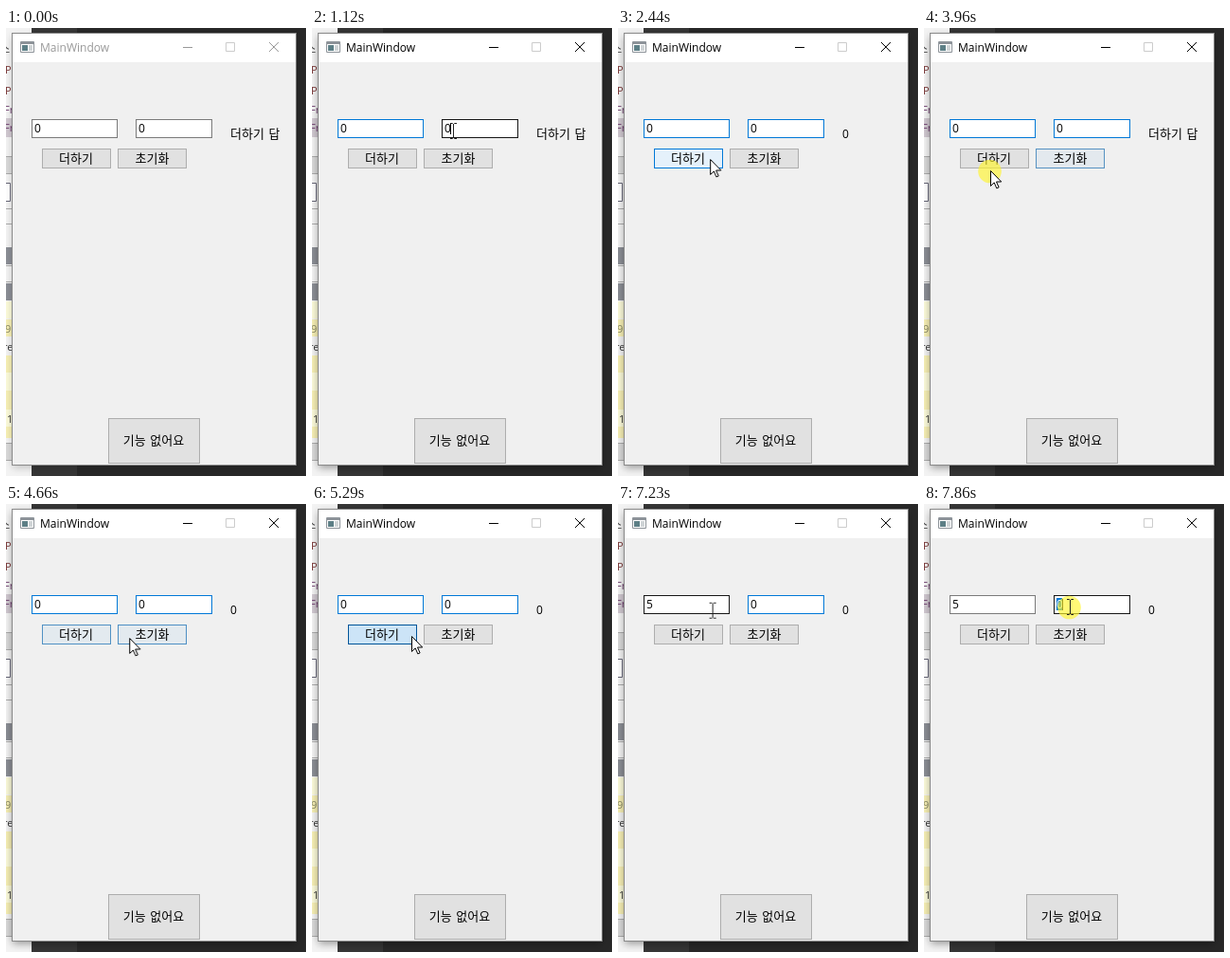
Recreate the animation shown at these times as an HTML page. Size 317 by 472 pixels, loop 8000 ms.

```html
<!DOCTYPE html>
<html lang="ko">
<head>
<meta charset="utf-8">
<title>Adder window</title>
<style>
html, body { margin: 0; width: 100%; height: 100%; overflow: hidden; background: #282828; }
svg { display: block; width: 317px; height: 472px; }
text { font: 12px "Open Sans", sans-serif; fill: #000; }
.ko { font: 13px "Noto Sans CJK KR", "Noto Sans CJK", sans-serif; word-spacing: 1px; }
.mid { text-anchor: middle; }
.code text { font-size: 11px; fill: #333; }
.field { fill: #fff; stroke: #7a7a7a; }
.button { fill: #e1e1e1; stroke: #adadad; }
.mark { fill: #0078d7; }
.sel text { fill: #fff; }
.caret { stroke: #000; }

/* hard switches use step-end, motion and fades use linear */
.step { animation: 8s step-end infinite; }
.flow { animation: 8s linear infinite; }

#title { animation-name: title; }
#glyphs { animation-name: glyphs; }
#shade { animation-name: shade; }
#field1 { animation-name: field1; }
#field2 { animation-name: field2; }
#zero1 { animation-name: zero1; }
#five { animation-name: five; }
#caret1 { animation-name: caret1; }
#caret2 { animation-name: caret2; }
#sel1 { animation-name: sel1; }
#sel2 { animation-name: sel2; }
#add { animation-name: add; }
#reset { animation-name: reset; }
#label { animation-name: label; }
#sum { animation-name: sum; }
#pointer { animation-name: path; }
#halo { animation-name: halo; }
#arrow { animation-name: arrow; }
#beam { animation-name: beam; }

@keyframes title { 0% { fill: #999; } 5.25% { fill: #000; } }
@keyframes glyphs { 0% { stroke: #999; } 5.25% { stroke: #000; } }
@keyframes shade { 0% { opacity: .55; } 5.25% { opacity: 1; } }

@keyframes field1 {
  0% { stroke: #7a7a7a; }
  5.25%, 18.225%, 72.575% { stroke: #171717; }
  11.625%, 23.25% { stroke: #0078d7; }
  91.95% { stroke: #7a7a7a; }
}
@keyframes field2 {
  0% { stroke: #7a7a7a; }
  12.54%, 93.56% { stroke: #171717; }
  17.24% { stroke: #0078d7; }
}
@keyframes zero1 { 0% { opacity: 1; } 80.625% { opacity: 0; } }
@keyframes five { 0% { opacity: 0; } 80.625% { opacity: 1; } }
@keyframes caret1 {
  0%, 11.875%, 23.25%, 87.125% { opacity: 0; }
  5.25%, 19.25%, 80.625% { opacity: 1; }
}
@keyframes caret2 { 0%, 19.25% { opacity: 0; } 13.75% { opacity: 1; } }
@keyframes sel1 { 0%, 80.625% { opacity: 0; } 74.875% { opacity: 1; } }
@keyframes sel2 { 0% { opacity: 0; } 97.375% { opacity: 1; } }

@keyframes add {
  0%, 24%, 33.75%, 51.04%, 59.375%, 63.75%, 72.5%, 100% { fill: #e1e1e1; stroke: #adadad; }
  25.375%, 27%, 30.5%, 31.46%, 52.5%, 53%, 55.625%, 57.3%, 64.375%, 67.875%, 70.75% { fill: #e5f1fb; stroke: #0078d7; }
  27.875%, 29%, 53.875%, 54.75%, 65.25%, 66.125% { fill: #cce4f7; stroke: #005499; }
}
@keyframes reset {
  0%, 31.94%, 51.875%, 57.65%, 65.375%, 100% { fill: #e1e1e1; stroke: #adadad; }
  34.125%, 40.5%, 44.25%, 47.175%, 58.75%, 59.5%, 62%, 63.125% { fill: #e5f1fb; stroke: #0078d7; }
  40.875%, 42%, 59.75%, 60.75% { fill: #cce4f7; stroke: #005499; }
}
@keyframes label {
  0%, 41.625%, 60.5% { opacity: 1; }
  27.875%, 53.875%, 65.25% { opacity: 0; }
}
@keyframes sum {
  0%, 41.625%, 60.5% { opacity: 0; }
  27.875%, 53.875%, 65.25% { opacity: 1; }
}

@keyframes path {
  0%, .875% { transform: translate(2px, 190px); }
  5%, 6.25% { transform: translate(60px, 105px); }
  10.5% { transform: translate(95px, 104px); }
  13.125%, 16.625% { transform: translate(149px, 108px); }
  19.25%, 21.75% { transform: translate(98px, 102px); }
  25.375% { transform: translate(92px, 136px); }
  28.75%, 30.5% { transform: translate(97px, 138px); }
  34.125%, 45.625% { transform: translate(150px, 137px); }
  49.375%, 50.625% { transform: translate(70px, 150px); }
  52.5%, 55.75% { transform: translate(80px, 141px); }
  58.75%, 61.25% { transform: translate(140px, 141px); }
  64.25%, 68.75% { transform: translate(105px, 139px); }
  73.25%, 90% { transform: translate(95px, 112px); }
  95%, 100% { transform: translate(154px, 108px); }
}
@keyframes halo {
  0%, 6.25%, 21%, 50.625%, 77.375% { opacity: 0; }
  5.25%, 19.25%, 48.75%, 74.125%, 96.5% { opacity: 1; }
}
@keyframes arrow {
  0%, 5%, 12.54%, 18.225%, 72.575%, 93.56% { opacity: 0; }
  .875%, 11.625%, 17.24%, 23.25%, 91.95% { opacity: 1; }
}
@keyframes beam {
  0%, 11.625%, 17.24%, 23.25%, 80.625%, 91.95% { opacity: 0; }
  5%, 12.54%, 18.225%, 72.575%, 90%, 93.56% { opacity: 1; }
}
</style>
</head>
<body>
<svg viewBox="0 0 317 472">
  <defs>
    <filter id="blur" x="-10%" y="-10%" width="120%" height="120%"><feGaussianBlur stdDeviation="4"/></filter>
  </defs>

  <!-- desktop behind the window -->
  <path fill="#282828" d="M0 0h317v472H0z"/>
  <path fill="#363636" d="M27 0h48v472H27z"/>
  <path fill="#f3f3f3" d="M0 0h27v472H0z"/>
  <g class="code">
    <path fill="#d0c8d0" d="M0 95h27v20H0z"/>
    <path fill="#d9d9d9" d="M0 135h27v18H0zM0 438h27v17H0z"/>
    <path fill="#8b8e95" d="M0 231h27v18H0zM0 269h27v18H0z"/>
    <path fill="#fbfad9" d="M0 288h27v18H0zM0 363h27v19H0zM0 402h27v18H0z"/>
    <path fill="#f6efb4" d="M0 307h27v18H0zM0 345h27v18H0zM0 382h27v20H0zM0 420h27v12H0z"/>
    <path fill="none" stroke="#aaa" d="M0 135.5h27M0 153.5h27M0 190.5h27M0 206.5h27M0 250.5h27M0 267.5h27M0 437.5h27M0 455.5h27"/>
    <path fill="#fff" stroke="#667" d="M-2 163.5H4.5v19H-2"/>
    <text class="ko" x="-6" y="26">스</text>
    <text x="-1" y="48" style="fill:#733">P</text>
    <text x="-1" y="70" style="fill:#733">P</text>
    <text x="-2" y="90" style="fill:#636">Fr</text>
    <text x="-2" y="109" style="fill:#636">Fr</text>
    <text x="-1" y="321" style="fill:#886">9</text>
    <text x="-3" y="340">re</text>
    <text x="1" y="416">1</text>
  </g>

  <!-- window frame -->
  <path id="shade" class="step" fill="#000" fill-opacity=".4" filter="url(#blur)" d="M7 9h299v454H7z"/>
  <path fill="#8a8a8a" d="M6 5h301v456H6z"/>
  <path fill="#f0f0f0" d="M7 6h299v454H7z"/>
  <path fill="#fff" d="M7 6h299v30H7z"/>
  <path fill="#fff" stroke="#8d9399" d="M15.5 14.5h14v11h-14z"/>
  <path fill="#8d9399" d="M16 15h13v2H16z"/>
  <path fill="#5d7f86" d="M17 18h6v6h-6z"/>
  <path fill="#cfd4d6" d="M24 18h4v6h-4z"/>
  <text id="title" class="step" x="36" y="25">MainWindow</text>
  <g id="glyphs" class="step" fill="none">
    <path d="M187 20.5h10"/>
    <path d="M278 15l10 10M288 15l-10 10"/>
  </g>
  <path fill="none" stroke="#ccc" d="M232.5 15.5h9v9h-9z"/>

  <!-- form -->
  <rect id="field1" class="field step" x="27.5" y="96.5" width="90" height="19"/>
  <text id="zero1" class="step" x="30" y="110">0</text>
  <text id="five" class="step" x="30" y="110">5</text>
  <path id="caret1" class="caret step" d="M36.5 100v12"/>
  <g id="sel1" class="sel step">
    <path class="mark" d="M30 99h6v13h-6z"/>
    <text x="30" y="110">0</text>
    <path class="caret" d="M36.5 100v12"/>
  </g>

  <rect id="field2" class="field step" x="137.5" y="96.5" width="80" height="19"/>
  <text x="140" y="110">0</text>
  <path id="caret2" class="caret step" d="M146.5 100v12"/>
  <g id="sel2" class="sel step">
    <path class="mark" d="M140 99h6v13h-6z"/>
    <text x="140" y="110">0</text>
    <path class="caret" d="M146.5 100v12"/>
  </g>

  <text id="label" class="ko step" x="237" y="116">더하기 답</text>
  <text id="sum" class="step" x="237" y="116">0</text>

  <rect id="add" class="button flow" x="38.5" y="127.5" width="72" height="20"/>
  <text class="ko mid" x="74" y="142">더하기</text>
  <rect id="reset" class="button flow" x="118.5" y="127.5" width="72" height="20"/>
  <text class="ko mid" x="154.5" y="142">초기화</text>
  <rect class="button" x="108.5" y="411.5" width="96" height="47"/>
  <text class="ko mid" x="156" y="439">기능 없어요</text>

  <!-- mouse pointer -->
  <g id="pointer" class="flow">
    <circle id="halo" class="step" cx="-.5" cy="1" r="12.3" fill="#fff52d" fill-opacity=".65"/>
    <path id="arrow" class="step" fill="#fff" stroke="#000" d="M.5 .5v16l3.7-3.6 2.6 6 2.3-1-2.6-5.9h5.2z"/>
    <path id="beam" class="step" fill="none" stroke="#222" d="M-3 -7.5h2.5l1 1 1-1H4M-3 8.5h2.5l1-1 1 1H4M.5 -7V8"/>
  </g>
</svg>
</body>
</html>
```
